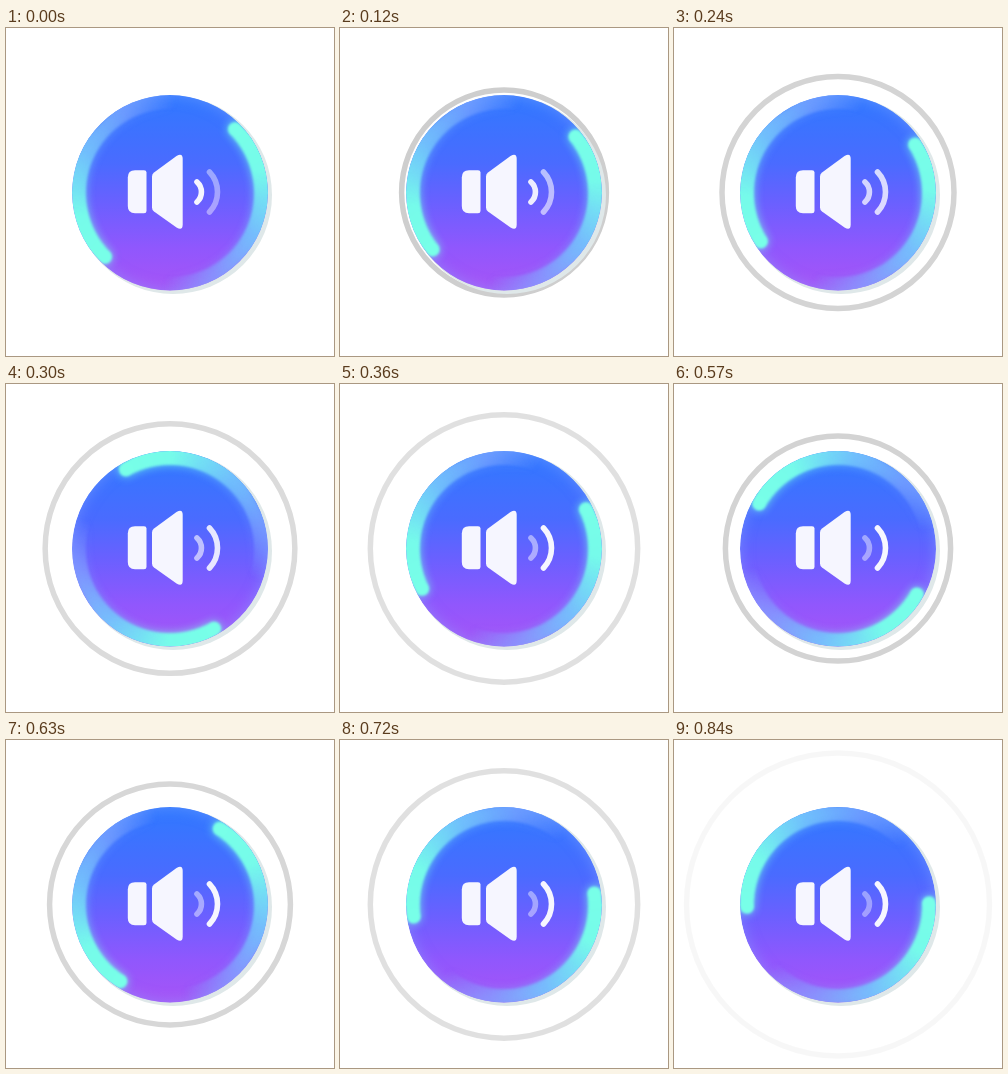
Write an HTML page that moves like this. It is 328x328 px and loops after 870 ms.

```html
<!DOCTYPE html>
<html lang="en">
<head>
<meta charset="utf-8">
<title>Sound button</title>
<style>
  html, body { margin: 0; width: 100%; height: 100%; overflow: hidden; background: #fff; }
  .stage { position: relative; width: 328px; height: 328px; overflow: hidden; }
  svg { position: absolute; inset: 0; }

  /* 29 ticks of 30 ms; the small delay keeps ticks clear of their edges */
  .ring, .wave, .spin { animation: 870ms -1ms infinite; }

  .ring { fill: none; stroke: #000; stroke-width: 5.5; }
  .first { animation-name: first; }
  .second { animation-name: second; }

  .disc {
    position: absolute; left: 66px; top: 66.5px; width: 196px; height: 196px;
    border-radius: 50%; overflow: hidden; clip-path: circle(50%);
    background: linear-gradient(#3079ff, #4a6bff 35%, #6a60ff 55%, #9057fd 78%, #a854f6);
    box-shadow: inset 0 0 14px #88a8ff80;
  }
  .spin { position: absolute; inset: 0; animation-name: spin; animation-timing-function: steps(29); }
  .arcs, .band { position: absolute; inset: 0; }
  .band {
    background: repeating-conic-gradient(
      #78ffe8 0deg, #76fbea 30deg, #74e2f4e8 48deg,
      #74c4fcd0 70deg, #80a8ff80 105deg, #80a0ff00 138deg, #80a0ff00 180deg);
    -webkit-mask: radial-gradient(circle, transparent 83.5px, #000 85px);
    mask: radial-gradient(circle, transparent 83.5px, #000 85px);
  }
  .cap {
    position: absolute; left: 91px; top: -.3px; width: 14px; height: 14px;
    border-radius: 50%; background: #78ffe8;
  }
  .cap + .cap { top: auto; bottom: -.3px; }
  .halo { filter: blur(5px); opacity: .8; }
  .crisp { filter: blur(.8px); }

  .icon { fill: #f6f6ff; }
  .wave { fill: none; stroke: #f6f6ff; stroke-width: 5.6; stroke-linecap: round; }
  .inner { animation-name: inner; }
  .outer { animation-name: outer; }

  @keyframes spin {
    from { transform: rotate(45.5deg); }
    to { transform: rotate(-1214.5deg); }
  }
  @keyframes first {
    0% { r: 90px; opacity: 0; animation-timing-function: steps(3); }
    10.345% { r: 99px; opacity: .2; animation-timing-function: steps(5); }
    27.586% { r: 116px; opacity: .17; animation-timing-function: steps(4); }
    41.379% { r: 133.7px; opacity: .12; animation-timing-function: steps(4); }
    55.172% { r: 151.5px; opacity: .03; animation-timing-function: steps(3); }
    65.517%, 100% { r: 155px; opacity: 0; }
  }
  @keyframes second {
    0%, 51.723% { r: 90px; opacity: 0; animation-timing-function: steps(1); }
    51.724% { r: 99px; opacity: .2; animation-timing-function: steps(5); }
    68.966% { r: 116px; opacity: .17; animation-timing-function: steps(4); }
    82.759% { r: 133.7px; opacity: .12; animation-timing-function: steps(4); }
    96.552% { r: 151.5px; opacity: .03; animation-timing-function: steps(1); }
    100% { r: 155px; opacity: 0; }
  }
  @keyframes inner {
    0% { opacity: 1; animation-timing-function: steps(4); }
    13.793% { opacity: .95; animation-timing-function: steps(4); }
    27.586% { opacity: .78; animation-timing-function: steps(4); }
    41.379% { opacity: .5; animation-timing-function: steps(4); }
    55.172% { opacity: .43; animation-timing-function: steps(5); }
    72.414% { opacity: .48; animation-timing-function: steps(7); }
    96.552%, 100% { opacity: .42; }
  }
  @keyframes outer {
    0% { opacity: .45; animation-timing-function: steps(4); }
    13.793% { opacity: .62; animation-timing-function: steps(4); }
    27.586% { opacity: .82; animation-timing-function: steps(4); }
    41.379%, 100% { opacity: 1; }
  }
</style>
</head>
<body>
<div class="stage">
  <svg width="328" height="328">
    <circle class="ring first" cx="164" cy="164.5" r="90" />
    <circle class="ring second" cx="164" cy="164.5" r="90" />
    <circle cx="167" cy="167" r="99" fill="#dfe8e9" />
  </svg>
  <div class="disc">
    <div class="spin">
      <div class="arcs halo"><div class="band"></div><i class="cap"></i><i class="cap"></i></div>
      <div class="arcs crisp"><div class="band"></div><i class="cap"></i><i class="cap"></i></div>
    </div>
  </div>
  <svg width="328" height="328">
    <g class="icon">
      <path d="M129 142.3H138Q140.500 142.300 140.500 144.500V183Q140.500 185.300 138 185.300H129Q121.800 185.300 121.800 178V149.500Q121.800 142.300 129 142.300Z" />
      <path d="M148 144.500L170.500 128Q176.700 124.500 176.700 131V196.500Q176.700 203 170.500 199.500L148 183.500Q146 182 146 179.500V148.500Q146 146 148 144.500Z" />
    </g>
    <path class="wave inner" d="M191 154A13.500 13.500 0 0 1 191 174" />
    <path class="wave outer" d="M203.500 144A29 29 0 0 1 203.500 184" />
  </svg>
</div>
</body>
</html>
```
